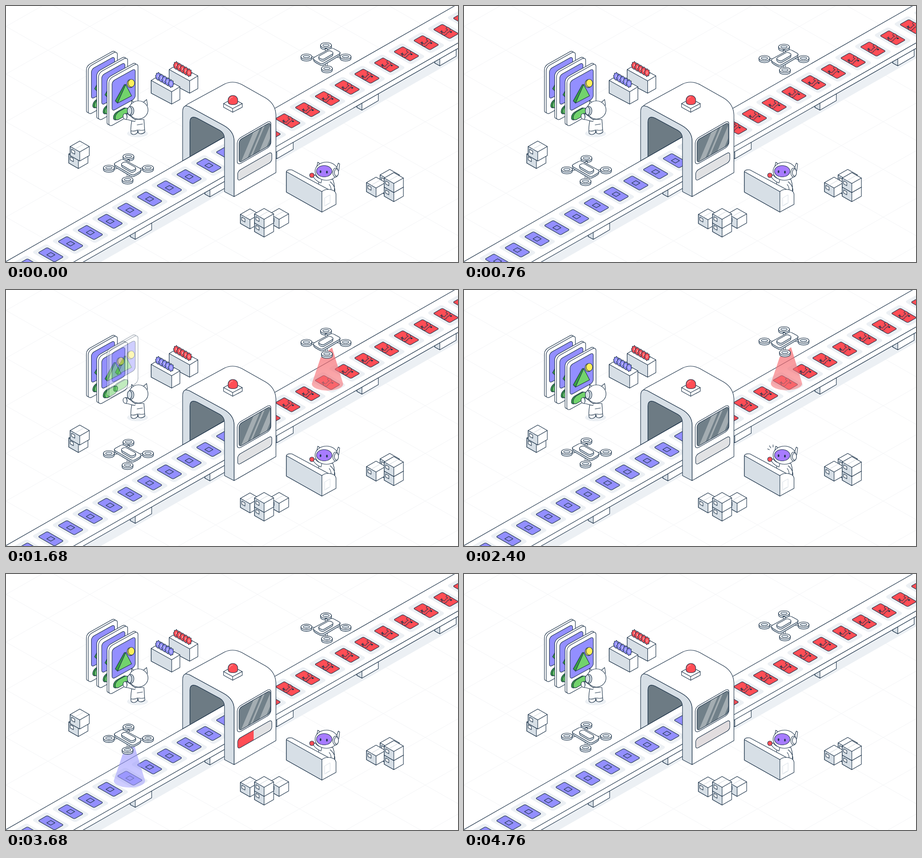
An HTML page for the animation above (4.8 s loop, 993 by 564 pixels).

```html
<!DOCTYPE html>
<html lang="en">
<head>
<meta charset="utf-8">
<title>Card factory</title>
<style>
html, body { margin: 0; width: 100%; height: 100%; overflow: hidden; background: #fff; }
svg { display: block; width: 993px; height: 564px; }
.l { stroke: #20364c; stroke-width: 1.15; stroke-linejoin: round; stroke-linecap: round; }
.l, .l * { vector-effect: non-scaling-stroke; }
.w { fill: #fff; } .g { fill: #d7dfe6; } .s { fill: #ecf0f4; } .n { fill: none; }
.p { fill: #938fff; } .r { fill: #ff4d55; } .k { fill: #20364c; } .v { fill: #a77cff; }
.e { fill: #72d36c; } .d { fill: #39a143; } .y { fill: #fff05a; }
</style>
</head>
<body>
<svg viewBox="0 0 993 564">
  <defs>
    <linearGradient id="redBeam" x2="0" y2="1">
      <stop stop-color="#f5656b" stop-opacity=".72"/><stop offset="1" stop-color="#f7777c" stop-opacity=".58"/>
    </linearGradient>
    <linearGradient id="blueBeam" x2="0" y2="1">
      <stop stop-color="#938fff" stop-opacity=".62"/><stop offset="1" stop-color="#a9a6ff" stop-opacity=".55"/>
    </linearGradient>
    <clipPath id="barClip"><rect width="75" height="22" rx="6"/></clipPath>
    <clipPath id="glass"><rect x="4" y="4" width="69" height="50" rx="6"/></clipPath>
  </defs>
  <g id="scene"></g>
</svg>
<script>
const LOOP = 4800, STEP = [43.4, -24.6], SLOT = [-22.7, -13.3];
const path = (d, c, extra = '') => `<path class="${c}" d="${d}" ${extra}/>`;
const poly = (pts, c) => path(`M${pts}Z`, c);
const oval = (x, y, rx, ry, c) => `<ellipse class="${c}" cx="${x}" cy="${y}" rx="${rx}" ry="${ry}"/>`;
const rect = (x, y, w, h, r, c, extra = '') =>
  `<rect class="${c}" x="${x}" y="${y}" width="${w}" height="${h}" rx="${r}" ${extra}/>`;
const group = (body, transform = '', attrs = '') => `<g transform="${transform}" ${attrs}>${body}</g>`;
const range = (a, b) => Array.from({ length: b - a }, (_, i) => a + i);
const beltY = (x, offset = 0) => 563 - .5715 * x + offset;
const beltBand = (a, b) => `-9 ${beltY(-9, a)} 1002 ${beltY(1002, a)} 1002 ${beltY(1002, b)} -9 ${beltY(-9, b)}`;

function floor() {
  const lines = range(-6, 12).map(i =>
    `M0 ${i * 105 + 45}l993 566M0 ${i * 105 + 45}l993 -566`).join('');
  return path(lines, 'n', 'stroke="#f3f4f6"');
}

// Box whose top corner is at (x, y)
function crate(x, y) {
  return poly(`${x} ${y} ${x + 21} ${y + 12} ${x + 21} ${y + 32} ${x} ${y + 44} ${x - 21} ${y + 32} ${x - 21} ${y + 12}`, 'l w') +
    poly(`${x - 21} ${y + 12} ${x} ${y + 24} ${x} ${y + 44} ${x - 21} ${y + 32}`, 'l g') +
    path(`M${x} ${y + 24}l21 -12`, 'l n') +
    path(`M${x - 11} ${y + 18}l21 -12`, 'n', 'stroke="#cbd3da"') +
    poly(`${x - 18} ${y + 18} ${x - 11} ${y + 22} ${x - 11} ${y + 29} ${x - 18} ${y + 25}`, 'l w');
}

function gear(x, y, color) {
  const pts = range(0, 16).map(i => {
    const a = i * Math.PI / 8 + .1, r = i % 2 ? 6.6 : 8.6;
    return `${(x + r * .75 * Math.cos(a)).toFixed(1)} ${(y + r * 1.05 * Math.sin(a)).toFixed(1)}`;
  }).join(' ');
  return poly(pts, 'l ' + color) + path(`M${x - 1} ${y - 3}l2 2 -2 2 2 2`, 'n', 'stroke="#fff"');
}

function gearBox(x, y, color) {
  return group(poly('0 11 18 0 63 25 63 53 45 63 0 39', 'l w') +
    poly('0 11 45 36 45 63 0 39', 'l g') + path('M45 36L63 25', 'l n') +
    range(0, 5).map(i => gear(15.5 + i * 7, 2 + i * 4, color)).join(''), `translate(${x} ${y})`);
}

function panel() {
  const skew = 'matrix(1 -.56 0 1 226 161)';
  return group(rect(-4, -4.5, 64, 106, 8, 'l w') + rect(0, 0, 64, 106, 8, 'l w') +
      rect(7, 9, 51, 66, 6, 'l p') +
      rect(10, 82, 29, 17, 8, 'l d') + rect(14, 84, 28, 17, 8, 'l e'), skew) +
    poly('260 173 240 209 245 214 264 173', 'l d') + poly('263 173 276 198 245 214', 'l e') +
    oval(273, 171, 7, 9, 'l y') + oval(275.5, 170, 7, 8.5, 'l y');
}

function builder() {
  return oval(289, 281, 23, 8, 's') +
    path('M277 250C274 263 274 275 275 281Q281 286 288 280L290 274L291 280Q298 284 305 278L303 250Z', 'l w') +
    path('M275 275Q282 277 289 273L290 279M304 273Q298 275 291 273M288 262l12 -2', 'l n') +
    path('M285 251C276 247 270 236 262 237C255 238 256 249 263 250C271 250 278 255 284 254', 'l w') +
    path('M263 237Q269 243 264 250', 'l g') +
    path('M302 212l7 -6 2 13M275 221l1 -13 6 6', 'l w') +
    oval(291, 229, 21, 20, 'l w') + oval(274, 231, 7, 10, 'l g') + oval(271.5, 231, 5, 9, 'l g');
}

function operator() {
  return path('M688 382Q685 396 690 412L720 412Q724 398 718 382Z', 'l w') +
    path('M712 387Q725 398 722 411M710 393Q717 402 712 410', 'l n') +
    path('M692 390Q681 386 674 375L679 372Q684 380 694 381Z', 'l w') + oval(672, 373, 5, 5, 'l r') +
    path('M726 358l4 -12 3 2 -2 15M682 358l3 -14 4 3', 'l w') +
    oval(704, 364, 25, 20, 'l w') + oval(724, 367, 6, 10, 'l w') + oval(726, 367, 4.5, 8, 'l w') +
    oval(699, 364, 17, 12.5, 'l v') +
    oval(691, 365, 1.8, 3, 'k') + oval(705, 366, 1.8, 3, 'k') +
    path('M667 350l4 2M671 343l3 5M679 341v5', 'l n', 'id="sparks"') +
    path('M616 365Q617 360 628 361L708 404Q724 405 725 415V437L694 454L616 410Z', 'l w') +
    poly('616 365 694 409 694 454 616 410', 'l g') + path('M694 409Q699 404 708 404', 'l n') +
    path('M700 423l12 -7v18l-12 7ZM702 439l8 -5', 'n', 'stroke="#d7dfe6"');
}

function leg(x) {
  const y = beltY(x, 98);
  return poly(`${x} ${y} ${x} ${y + 15} ${x - 36} ${y + 36} ${x - 47} ${y + 30} ${x - 47} ${y + 20}`, 'l w') +
    poly(`${x - 36} ${y + 20} ${x - 36} ${y + 36} ${x - 47} ${y + 30} ${x - 47} ${y + 26}`, 'l g');
}

function card(k) {
  const red = k >= -2;
  const swirl = 'M3 -7C9 -5 7 -2 3 0S-1 8 -6 5';
  const icon = red
    ? path(swirl, 'n', 'stroke="#20364c" stroke-width="6.2" stroke-linecap="round"') +
      path(swirl, 'n', 'stroke="#ff4d55" stroke-width="4.2" stroke-linecap="round"') +
      path('M-12 0l5 1M-9 -2l-1 5', 'l n', 'style="stroke-width:1.6"') + oval(11, 1, 2.3, 1.8, 'k')
    : '';
  const flat = rect(-16, -26, 32, 52, 5, 's') + rect(-10, -18, 20, 36, 2.5, red ? 'l r' : 'l p') +
    (red ? '' : rect(-4.5, -4.5, 9, 9, 0, 'l p'));
  return group(group(flat, 'matrix(1 -.57 1 .573 0 0)') + icon,
    `translate(${619.3 + STEP[0] * k} ${253 + STEP[1] * k})`);
}

function gate() {
  const side = 'matrix(1 -.575 0 1 ';
  const glass = rect(4, 4, 69, 50, 6, '', 'fill="#718089"') +
    path('M4 62L38 0H52L18 62ZM24 62L58 0H63L29 62ZM44 62L76 4V32L60 62Z', '', 'fill="#a4adb2"');
  return path('M390 226Q393 219 403 214L480 172Q499 163 518 173L571 203Q592 216 593 240V367L501 420V297Q501 276 478 263L403 222Z', 'l w') +
    path('M388 341V234Q388 215 403 222L478 263Q501 276 501 297V420L480 409V292Q480 280 470 274L420 247Q404 240 404 256V332Z', 'l g') +
    group(rect(0, 0, 74, 57, 8, 'l w') + group(glass, '', 'clip-path="url(#glass)"') +
      rect(4, 4, 69, 50, 6, 'l n'), side + '508 294)') +
    group(rect(0, 0, 75, 22, 6, '', 'fill="#e1e2e4"') +
      `<g clip-path="url(#barClip)"><rect id="bar" class="r" height="22"/></g>` +
      rect(0, 0, 75, 22, 6, 'l n'), side + '509 364)') +
    poly('478 215 498 204 519 215 519 223 498 234 478 223', 'l w') + path('M478 215L498 226L519 215M498 226v8', 'l n') +
    path('M488 207a10.5 10 0 0 1 21 0v5a10.5 5.5 0 0 1 -21 0Z', 'l r') +
    path('M491 207a7.5 7 0 0 1 7 -6.5', 'n', 'stroke="#ffa2a6" stroke-width="1.3"');
}

// The origin is the centre of the rear rotor
function drone() {
  const rotor = (x, y) => path(`M${x - 12} ${y - 1}v4a12 6 0 0 0 24 0v-4`, 'l g') +
    oval(x, y - 1, 12, 6, 'l w') + oval(x, y - 1, 7, 3, 'l g');
  const arm = d => path(d, 'l n', 'style="stroke-width:5"') + path(d, 'n', 'stroke="#fff" stroke-width="3"');
  return rotor(0, 0) + arm('M0 7L2 14') + arm('M-32 26L-20 29') + arm('M32 25L20 22') + arm('M1 46V38') +
    path('M-27 28V33Q-26 36 -14 42Q-9 45 -4 42L28 23Q31 21 31 15Z', 'l g') +
    path('M-25 25L8 7Q13 4 18 7L29 13Q33 16 28 19L-5 38Q-10 41 -15 38L-25 32Q-30 28 -25 25Z', 'l w') +
    path('M-16 25V29Q-12 35 -6 34L13 23Q16 21 15 15Z', 'l g') +
    path('M-14 22L4 12Q8 10 13 13Q18 16 13 19L-4 29Q-8 31 -13 28Q-18 25 -14 22Z', 'l w') +
    rotor(-43, 25) + rotor(43, 25) + rotor(2, 51);
}

const beam = id => path('M-34.5 0L-15 -58L10 -80L34.5 0A34.5 15 0 0 1 -34.5 0Z', '',
  `fill="url(#${id})" id="${id}Shape"`);

const $ = id => document.getElementById(id);
$('scene').innerHTML = floor() +
  gearBox(358.5, 129, 'r') + gearBox(319, 153, 'p') +
  [3, 2, 1, 0].map(i => group(panel(), '', `id="panel${i}"`)).join('') + builder() +
  crate(159, 314) + crate(162, 297.5) +
  poly(beltBand(98, 120), 's') + [320, 484, 631, 818, 989].map(leg).join('') +
  poly(beltBand(0, 98), 'l w') + path(`M-9 ${beltY(-9, 86)}L1002 ${beltY(1002, 86)}`, 'l n') +
  path('M404 332V256Q404 240 420 247L470 274Q480 280 480 288Z', 'l', 'fill="#6d7b84"') +
  group(range(-16, 11).map(card).join(''), '', 'id="cards"') + gate() +
  beam('redBeam') + beam('blueBeam') +
  group(drone(), '', 'id="drone0"') + group(drone(), '', 'id="drone1"') +
  operator() +
  crate(536, 447) + crate(600, 446) + crate(567, 465) + crate(567, 446) +
  crate(843, 377) + crate(843, 360) + crate(813, 377) + crate(852, 387) + crate(852, 367);

const move = (id, x, y, more = '') => $(id).setAttribute('transform', `translate(${x} ${y}) ${more}`);
const fade = (id, value) => $(id).setAttribute('opacity', value);
const wave = x => (1 - Math.cos(Math.PI * x)) / 2;

function render(t) {
  const ramp = (a, b) => Math.min(1, Math.max(0, (t - a) / (b - a)));

  const travel = wave(ramp(0, 1670));
  move('cards', STEP[0] * travel, STEP[1] * travel);

  const bob = wave(t / 1200);
  move('drone0', 703, 87.5 + 5 * bob);
  move('drone1', 269, 332.5 + 5 * bob, 'scale(-1 1)');
  move('redBeamShape', 708.5 - 3.4 * bob, 206 + bob);
  move('blueBeamShape', 274.5 - 3.4 * bob, 454.5 + bob);
  fade('redBeamShape', ramp(1480, 1660) - ramp(3420, 3600));
  fade('blueBeamShape', ramp(2860, 3060) - ramp(4520, 4700));

  // The front panel rises and dissolves, then the stack advances by one slot
  const shift = wave(ramp(1740, 2240)), gone = shift === 1;
  for (const i of [1, 2, 3]) {
    const slot = gone ? i : i - shift;
    move('panel' + i, SLOT[0] * slot, SLOT[1] * slot);
  }
  // Once in place, the advanced stack is identical to the stack at rest
  move('panel0', 0, gone ? 0 : -35 * wave(ramp(1320, 1840)));
  fade('panel0', gone ? 1 : 1 - ramp(1450, 1860));
  fade('panel3', gone ? 0 : shift);

  fade('sparks', ramp(2280, 2360) - ramp(3320, 3440));
  $('bar').setAttribute('width', 75 * (.467 * ramp(2400, 3680) + .533 * ramp(3680, 4480)));
  fade('bar', 1 - ramp(4540, 4768));
}

function tick(now) {
  render(now % LOOP);
  requestAnimationFrame(tick);
}
requestAnimationFrame(tick);
</script>
</body>
</html>
```
